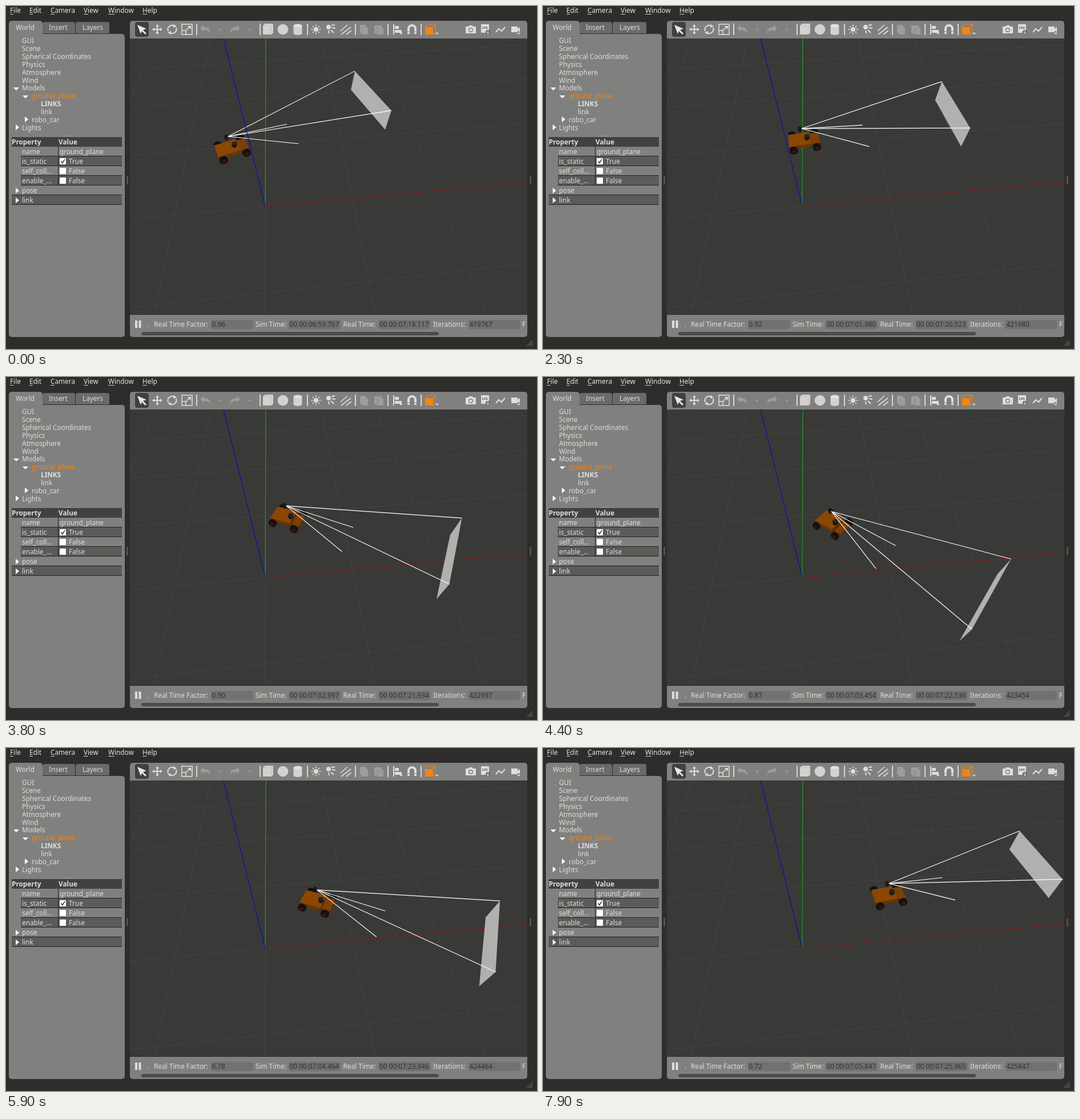
An HTML page with a canvas for the animation above (8000 ms loop, 930x602 px).

```html
<!DOCTYPE html>
<html lang="en">
<head>
<meta charset="utf-8">
<title>Robot simulator</title>
<style>
html, body { margin: 0; width: 100%; height: 100%; overflow: hidden; background: #2e2d2b; }
canvas { display: block; }
</style>
</head>
<body>
<canvas id="stage" width="930" height="602"></canvas>
<script>
const g = document.getElementById('stage').getContext('2d');
const LOOP = 8000, STEP = 100;
const HELD_STEPS = [32, 37, 42, 46, 52, 56];
const PANEL = '#80807e', LIGHT = '#dededc', DIM = '#9d9d9b', DARK = '#30302f', ORANGE = '#f5830f';
const PLAIN = '11.8px', BOLD = 'bold 11.8px';

// time s, x, y, heading in degrees
const PATH = [
  [0, -.561, .866, 19.05], [.9, -.472, .897, 19.05], [1.3, -.383, .929, 19.05],
  [1.85, -.243, .977, 19.05], [2.3, -.121, .994, 5.84], [3.05, .022, .977, -11],
  [3.8, .162, .932, -27.5], [4.4, .278, .852, -41.9], [5, .375, .761, -41.9],
  [5.18, .401, .737, -41.9], [5.9, .518, .661, -26.5], [6.8, .691, .621, -7.12],
  [7.42, .832, .62, 7.65], [8, .957, .637, 7.65]];
// time s, simulated ms, real ms, real time factor
const STATS = [
  [0, 419767, 438117, .96], [1.3, 421075, 439520, .95], [2.3, 421980, 440523, .92],
  [3.8, 422997, 441934, .9], [5, 423910, 443138, .84], [6.8, 425018, 444754, .73],
  [7.9, 425847, 445965, .72], [8, 425922, 446065, .72]];

function sample(keys, t) {
  let i = 1;
  while (i < keys.length - 1 && keys[i][0] < t) i++;
  const a = keys[i - 1], b = keys[i], k = (t - a[0]) / (b[0] - a[0]);
  return a.map((v, j) => v + (b[j] - v) * k);
}

// ---- drawing helpers
function rect(x, y, w, h, color, r = 0) {
  g.fillStyle = color;
  g.beginPath();
  g.roundRect(x, y, w, h, r);
  g.fill();
}
function text(s, x, y, color = LIGHT, font = PLAIN) {
  g.fillStyle = color;
  g.font = font + ' "Noto Sans", sans-serif';
  g.fillText(s, x, y);
}
function poly(points, color) {
  g.fillStyle = color;
  g.beginPath();
  points.forEach(p => g.lineTo(p[0], p[1]));
  g.closePath();
  g.fill();
}
function line(a, b, color, width = 1) {
  g.strokeStyle = color;
  g.lineWidth = width;
  g.beginPath();
  g.moveTo(a[0], a[1]);
  g.lineTo(b[0], b[1]);
  g.stroke();
}
function icon(x, y, d, color = LIGHT, width = 0) {
  g.save();
  g.translate(x, y);
  const p = new Path2D(d);
  g.fillStyle = g.strokeStyle = color;
  g.lineWidth = width;
  width ? g.stroke(p) : g.fill(p);
  g.restore();
}
function oval(x, y, rx, ry, color) {
  g.fillStyle = color;
  g.beginPath();
  g.ellipse(x, y, rx, ry, 0, 0, 7);
  g.fill();
}
const DOWN = 'M-5-2H5L0 3Z', RIGHT = 'M-3-5V5L3 0Z', SMALL_DOWN = 'M-3-1H3L0 2Z';

// ---- camera: pitched down, slightly yawed, 60 degree field of view
const FOCAL = 603, SIN = .769, COS = .639, YAW = .1143, SY = Math.sin(YAW), CY = Math.cos(YAW);
function project(x, y, z = 0) {
  const right = x * CY - y * SY - .7176, ahead = x * SY + y * CY;
  const down = .3428 - ahead * SIN - z * COS, depth = 3.9 + ahead * COS - z * SIN;
  return [565 + FOCAL * right / depth, 299 + FOCAL * down / depth];
}

function drawCar(place) {
  const face = (points, color) => {
    const q = points.map(p => place(...p));
    const area = q.reduce((s, p, i) => {
      const n = q[(i + 1) % q.length];
      return s + p[0] * n[1] - n[0] * p[1];
    }, 0);
    if (area < 0) poly(q, color);
  };
  const box = (x0, x1, w, z0, z1, top, side) => {
    face([[x1, -w, z0], [x1, w, z0], [x1, w, z1], [x1, -w, z1]], '#5a2d02');
    face([[x0, w, z0], [x0, -w, z0], [x0, -w, z1], [x0, w, z1]], '#703803');
    face([[x0, -w, z0], [x1, -w, z0], [x1, -w, z1], [x0, -w, z1]], side);
    face([[x0, -w, z1], [x1, -w, z1], [x1, w, z1], [x0, w, z1]], top);
  };
  const disc = (x, y, r, color) => poly(Array.from({ length: 20 }, (_, i) =>
    place(x + r * Math.cos(i * Math.PI / 10), y, .05 + r * Math.sin(i * Math.PI / 10))), color);
  const wheel = (x, side) => {
    for (let i = 0; i < 5; i++) disc(x, side * .145 + .02 - i * .01, .05, '#131312');
    if (side < 0) disc(x, -.166, .025, '#560b08');
  };
  wheel(-.146, 1);
  wheel(.15, 1);
  box(.08, .2, .1, .04, .075, '#7d3f04', '#5f3003');
  box(-.193, .08, .112, .04, .095, '#8b4704', '#693503');
  wheel(-.146, -1);
  wheel(.15, -1);
  const head = place(.046, 0, .115), mast = place(-.024, 0, .27);
  oval(head[0], head[1] + 1, 4.8, 5.2, '#1a1a19');
  oval(head[0], head[1] - 2, 4.5, 3, '#252524');
  line(mast, place(-.02, 0, .22), '#1a1a19', 4);
  oval(mast[0], mast[1], 3.3, 4.8, '#1a1a19');
}

function drawScene(t) {
  g.save();
  g.beginPath();
  g.rect(217, 57, 696, 484);
  g.clip();
  rect(217, 57, 696, 484, '#393937');
  for (let k = -7; k <= 10; k++) {
    line(project(k, -1.5), project(k, 10), '#444442');
    if (k > -2) line(project(-8, k), project(k ? 8 : 0, k), '#444442');
  }
  line(project(0, 0), project(5, 0), '#861e1d', 1.1);
  line(project(0, 0), project(0, 8), '#1f9a1f', 1.2);

  const [, x, y, degrees] = sample(PATH, t);
  const c = Math.cos(degrees * Math.PI / 180), s = Math.sin(degrees * Math.PI / 180);
  // local origin lies below the sensor, a little ahead of the turning point
  const place = (u, v, z) => project(x + (u + .15) * c - v * s, y + (u + .15) * s + v * c, z);
  const apex = place(0, 0, .27);
  const topLeft = place(2.05, .515, .31), topRight = place(2.05, -.485, .31);
  poly([topLeft, topRight, place(1.997, -.492, 0), place(1.997, .508, 0)], '#b0b0ae');
  drawCar(place);
  [topLeft, topRight, place(.823, .193, 0), place(.823, -.233, 0)]
    .forEach(p => line(apex, p, '#fff', 1.1));
  line(project(0, 0), project(0, 0, 2.4), '#1212ac', 1.3);
  g.restore();
}

function drawSidePanel() {
  ['File', 'Edit', 'Camera', 'View', 'Window', 'Help'].forEach((name, i) => {
    const left = [7, 41, 78, 136, 179, 239][i];
    text(name, left, 12, '#e4e4e2');
    rect(left, 14, [6, 6, 7, 8, 11, 8][i], 1, '#cfcfcd');
  });
  rect(64, 28, 57, 20, '#6a6a68', [4, 4, 0, 0]);
  rect(122, 28, 59, 20, '#6a6a68', [4, 4, 0, 0]);
  rect(5, 49, 203, 532, PANEL, [0, 5, 5, 5]);
  rect(5, 26, 59, 25, PANEL, [5, 5, 0, 0]);
  text('World', 17, 42);
  text('Insert', 75, 42);
  text('Layers', 134, 42);

  ['GUI', 'Scene', 'Spherical Coordinates', 'Physics', 'Atmosphere', 'Wind', 'Models',
    'ground_plane', 'LINKS', 'link', 'robo_car', 'Lights'].forEach((name, i) =>
    text(name, { 7: 45, 8: 61, 9: 61, 10: 45 }[i] || 28, 65.3 + 13.85 * i,
      i === 7 ? ORANGE : LIGHT, i === 8 ? BOLD : PLAIN));
  icon(18, 145, DOWN, '#fff');
  icon(34, 159, DOWN, '#fff');
  icon(36, 199, RIGHT, '#fff');
  icon(20, 213, RIGHT, '#fff');
  for (let i = 0; i < 6; i++) {
    rect(101 + i * 2.6, 227.5, 1.2, 1.5, '#a2a2a0');
    rect(211.5, 299 + i * 2.4, 2, 1.3, '#8d8d8b');
    rect(917.5, 299 + i * 2.4, 2, 1.3, '#8d8d8b');
  }

  rect(10, 230, 193, 17, '#414140');
  text('Property', 10, 243, LIGHT, BOLD);
  text('Value', 92, 243, LIGHT, BOLD);
  ['name', 'is_static', 'self_coll…', 'enable_…', 'pose', 'link'].forEach((name, i) => {
    const top = 247 + i * 17, child = i < 4;
    if (i % 2) rect(child ? 26 : 10, top, child ? 177 : 193, 17, '#5b5b59');
    rect(child ? 26 : 10, top + 16, child ? 177 : 193, 1, '#222221');
    text(name, 28, top + 13);
    if (!child) return icon(20, top + 9, RIGHT, '#fff');
    rect(91, top, 1, 17, '#222221');
    if (!i) return text('ground_plane', 94, top + 13);
    rect(94, top + 3, 11, 11, '#fff', 1);
    text(i === 1 ? 'True' : 'False', 110, top + 13);
  });
  icon(94, 267, 'M2.5 5.5L5 8.5L9 2', '#222', 1.4);
}

function drawToolbar() {
  rect(217, 26, 696, 31, PANEL, [5, 5, 0, 0]);
  rect(226, 28, 24, 26, '#40403f', 4);
  icon(238, 41, 'M-8-8L8-1L2 1L8 7L6 9L0 3L-2 8Z', '#e8e8e6');
  icon(265, 41, 'M0-9L3-5H1V-1H5V-3L9 0L5 3V1H1V5H3L0 9L-3 5H-1V1H-5V3L-9 0L-5-3V-1H-1V-5H-3Z');
  icon(291, 41, 'M-7 3A7.5 7.5 0 0 1 4-6M7-3A7.5 7.5 0 0 1-4 6', LIGHT, 2);
  icon(291, 41, 'M3-9L8-5L2-3ZM-3 9L-8 5L-2 3Z');
  icon(317, 41, 'M-9-9H9V9H-9ZM-9 2H-2V9M-3 3L5-5', LIGHT, 1.5);
  icon(317, 41, 'M1-6H7V0Z');
  icon(349, 41, 'M-9-2L-3-8V-4Q8-5 9 7Q5 0-3 1V4Z', DIM);
  icon(375, 41, SMALL_DOWN, DIM);
  icon(401, 41, 'M9-2L3-8V-4Q-8-5-9 7Q-5 0 3 1V4Z', DIM);
  icon(427, 41, SMALL_DOWN, DIM);
  [334, 445, 528, 612, 669, 727].forEach(x => rect(x - .8, 31, 1.7, 20, '#e6e6e4'));

  icon(459, 41, 'M-9-7L-5-10H9V6L6 9H-9Z', '#d2d2d0');
  icon(459, 41, 'M-9-7H6V9M6-7L9-10', '#c2c2c0', 1);
  oval(485, 41, 9.3, 9.3, '#d2d2d0');
  icon(511, 41, 'M-7.5-6V7A7.5 3 0 0 0 7.5 7V-6Z', '#d2d2d0');
  oval(511, 34.5, 7.5, 3, '#e2e2e0');
  oval(543, 41, 4, 4, LIGHT);
  for (let i = 0; i < 8; i++) {
    const u = Math.cos(i * Math.PI / 4), v = Math.sin(i * Math.PI / 4);
    line([543 + 5.5 * u, 41 + 5.5 * v], [543 + 8.5 * u, 41 + 8.5 * v], LIGHT, 1.6);
  }
  oval(565, 37, 4, 4, LIGHT);
  icon(565, 37, 'M5-3L11-4M6 1L12 2M4 5L9 10M0 6L1 11', LIGHT, 2);
  icon(595, 41, 'M-9 3L3-8M-8 9L9-4M1 9L10 2', LIGHT, 1.6);
  icon(627, 41, 'M-7-8H2L5-4V-3H7V9H-4V6H-7Z', DIM);
  icon(653, 41, 'M-8-7H5V-3H8V9H-3V7H-8Z', DIM);
  icon(653, 41, 'M-3-8H2M-2-3V7', PANEL, 1);
  icon(685, 41, 'M-7-9H-5V9H-7ZM-4-6H3V-1H-4ZM-4 1H8V6H-4Z');
  icon(692, 48, SMALL_DOWN);
  icon(711, 41, 'M-6 8V-1A6 6 0 0 1 6-1V8', LIGHT, 4);
  icon(711, 41, 'M-9 4H-3M3 4H9', PANEL, 1);
  icon(743, 41, 'M-9-4H5V9H-9Z', ORANGE);
  icon(743, 41, 'M-9-4L-5-9H9V5L5 9M9-9L5-4', ORANGE, 1.2);
  icon(755, 48, SMALL_DOWN);

  icon(814, 41, 'M-9-5H-4L-3-7H3L4-5H9V7H-9Z');
  oval(814, 42, 4, 4, PANEL);
  oval(814, 42, 2.5, 2.5, LIGHT);
  rect(832, 32, 14, 15, LIGHT, 1);
  text('LOG', 833.5, 39.5, '#50504f', 'bold 5px');
  oval(844, 46, 4, 4, '#6a6a68');
  icon(844, 46, 'M0-3V2M-2 0L0 3L2 0', LIGHT, 1);
  icon(866, 41, 'M-8 5L-3-1L2 3L8-4', LIGHT, 2);
  icon(893, 41, 'M-8-5H3V-1L7-4V5L3 2V5H-8Z');
  icon(898, 48, SMALL_DOWN);
}

function clock(ms) {
  const pad = (n, size = 2) => String(n).padStart(size, '0');
  return `00 00:${pad(Math.floor(ms / 60000))}:${pad(Math.floor(ms / 1000) % 60)}.${pad(ms % 1000, 3)}`;
}

function drawStatusBar(t) {
  const [, sim, real, factor] = sample(STATS, t).map((v, i) => i < 3 ? Math.round(v) : v);
  rect(217, 542, 696, 39, PANEL, [0, 0, 5, 5]);
  rect(226, 552, 4, 13, LIGHT);
  rect(232.5, 552, 4, 13, LIGHT);
  text('.', 248, 563);
  [['Real Time Factor:', 259, factor.toFixed(2), 359, 74],
    ['Sim Time:', 437, clock(sim), 495, 91],
    ['Real Time:', 590.5, clock(real), 652.5, 91],
    ['Iterations:', 748, String(sim), 810, 90]].forEach(([label, x, value, left, width]) => {
    text(label, x, 563);
    rect(left, 551, width, 16, '#71716f', 3);
    text(value, left + 1.5, 563, DARK);
  });
  g.save();
  g.beginPath();
  g.rect(900, 545, 10, 25);
  g.clip();
  text('F', 904, 563);
  g.restore();
  rect(237, 572, 521, 6, '#4b4b4a', 3);
}

function draw() {
  let step = Math.floor(performance.now() % LOOP / STEP);
  if (HELD_STEPS.includes(step)) step--;
  const t = step * STEP / 1000;
  rect(0, 0, 930, 602, '#2e2d2b');
  drawSidePanel();
  drawToolbar();
  drawScene(t);
  drawStatusBar(t);
  for (let i = 0; i < 4; i++)
    for (let j = 0; j <= i; j++) rect(920.5 - j * 2.5, 587 + i * 2.5, 1.3, 1.3, '#8d8d8b');
  requestAnimationFrame(draw);
}
draw();
</script>
</body>
</html>
```
